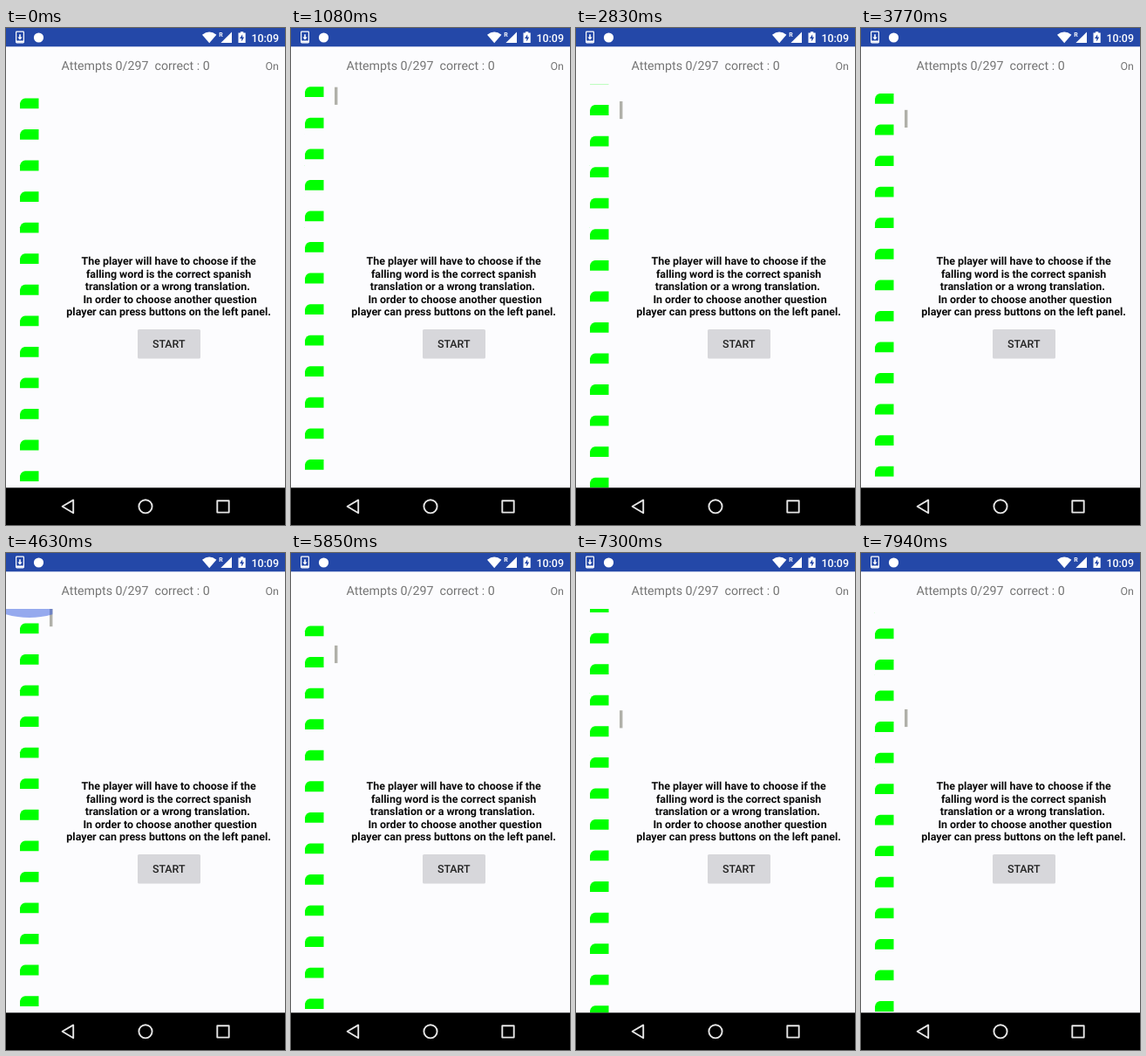
Write an HTML page that moves like this. It is 320x569 px and loops after 8 s.

```html
<!DOCTYPE html>
<html lang="en">
<head>
<meta charset="utf-8">
<title>Falling words</title>
<style>
  html, body { margin: 0; width: 100%; height: 100%; overflow: hidden; background: #fcfcfe; }
  svg { display: block; width: 320px; height: 569px; }
  text { font-family: Roboto, sans-serif; font-size: 12.44px; white-space: pre; text-rendering: geometricPrecision; }
  .white { fill: #fff; }
  .muted { fill: #757575; }
  .help { font-weight: 700; fill: #0a0a0a; text-anchor: middle; }
  .medium { font-weight: 500; }
  .line { fill: none; stroke: #e6e6e6; stroke-width: 1.9; stroke-linejoin: round; }
</style>
</head>
<body>
<svg viewBox="0 0 320 569">
  <defs>
    <clipPath id="panel"><rect y="64" width="54" height="462.3"/></clipPath>
    <path id="tab" d="M16 11.8V5.6Q17.6 .4 21.8 0H37.5V11.8Z" fill="#00ff00"/>
  </defs>
  <rect width="320" height="569" fill="#fcfcfe"/>

  <!-- status bar -->
  <rect width="320" height="21.3" fill="#2448a8"/>
  <rect x="11.6" y="4.2" width="8.8" height="12.6" rx=".8" fill="none" stroke="#fff" stroke-width="1.2"/>
  <path class="white" d="M15.2 7.2h1.6v3.2h1.9L16 13.4l-2.7-3h1.9zM12 14.6h8v2h-8z"/>
  <circle class="white" cx="37.5" cy="11" r="5.6"/>
  <path class="white" d="M225 7.7Q233.2 1.3 241.4 7.7L233.2 17.2Z"/>
  <path class="white" d="M259 4.6V17H246.4Z"/>
  <text class="white" x="244.2" y="9.8" style="font-size:7px;font-weight:700">R</text>
  <path class="white" d="M266.5 5.6h2.4V4.2h3.4v1.4h2.4V17h-8.2z"/>
  <path d="M271.2 7.2l-3.2 4.7h2.2v3.5l3-4.9h-2z" fill="#2448a8"/>
  <text class="white medium" x="281.4" y="15.5">10:09</text>

  <!-- header -->
  <text class="muted" x="63.6" y="48.2" style="font-size:14.22px">Attempts 0/297  correct : 0</text>
  <text class="muted" x="297.4" y="47.5">On</text>

  <!-- instructions -->
  <g class="help">
    <text x="186.6" y="271">The player will have to choose if the</text>
    <text x="186.6" y="285.6">falling word is the correct spanish</text>
    <text x="185.3" y="300.2">translation or a wrong translation.</text>
    <text x="188" y="314.7">In order to choose another question</text>
    <text x="186.6" y="329.2">player can press buttons on the left panel.</text>
  </g>
  <rect x="151" y="345" width="72" height="33.5" rx="1.6" fill="#d7d7db"/>
  <text class="medium" x="186.7" y="366" text-anchor="middle" fill="#222">START</text>

  <!-- side list -->
  <g clip-path="url(#panel)">
    <g id="list"></g>
    <rect id="thumb" x="50" width="3.4" height="20.2" fill="#b0b0a9"/>
    <path id="glow" d="M0 0H53.4V6.2Q26.7 13.8 0 6.2Z" fill="#3058e0"/>
  </g>

  <!-- navigation bar -->
  <rect y="526.3" width="320" height="43" fill="#000"/>
  <path class="line" d="M64.6 547.8L77.2 540.4V555.2Z"/>
  <circle class="line" cx="160" cy="547.8" r="7.6"/>
  <rect class="line" x="242.3" y="541.2" width="13.4" height="13.4"/>
</svg>
<script>
const LOOP = 8000, PITCH = 320 / 9, TOP = 64, FIRST = 80.5;
const VIEW = 462.2, TOTAL = 297 * PITCH;

// Each swipe eases the list to a new scroll offset.
const swipes = [
  { from: 500, until: 1970, to: 245 },
  { from: 2070, until: 3630, to: 681 },
  { from: 3770, until: 4260, to: 0 },
  { from: 5357, until: 6580, to: 2684.4 },
  { from: 6680, until: 7940, to: 2625.2 }
];

const ramp = (t, a, b) => Math.min(1, Math.max(0, (t - a) / (b - a)));
const ease = u => u * u * (3 - 2 * u);

const scrollAt = t => swipes.reduce(
  (y, s) => y + (s.to - y) * ease(ramp(t, s.from, s.until)), 0);
const glowAt = t => ease(ramp(t, 4230, 4530)) - ease(ramp(t, 4650, 5100));

const [list, thumb, glow] = ['list', 'thumb', 'glow'].map(id => document.getElementById(id));

for (let i = 0; i < 14; i++) {
  const tab = document.createElementNS('http://www.w3.org/2000/svg', 'use');
  tab.setAttribute('href', '#tab');
  tab.setAttribute('y', FIRST + i * PITCH);
  list.append(tab);
}

function draw(now) {
  const t = Math.floor(now % LOOP / 10) * 10;
  const y = scrollAt(t), g = glowAt(t);
  list.setAttribute('transform', `translate(0 ${-(y % PITCH)})`);
  thumb.setAttribute('y', TOP + y * VIEW / TOTAL);
  thumb.setAttribute('opacity', t < swipes[0].from ? 0 : 1);
  glow.setAttribute('transform', `translate(0 ${TOP}) scale(1 ${g})`);
  glow.setAttribute('opacity', 0.5 * g);
}

const start = performance.now();
function tick() {
  draw(performance.now() - start);
  requestAnimationFrame(tick);
}
tick();
</script>
</body>
</html>
```
